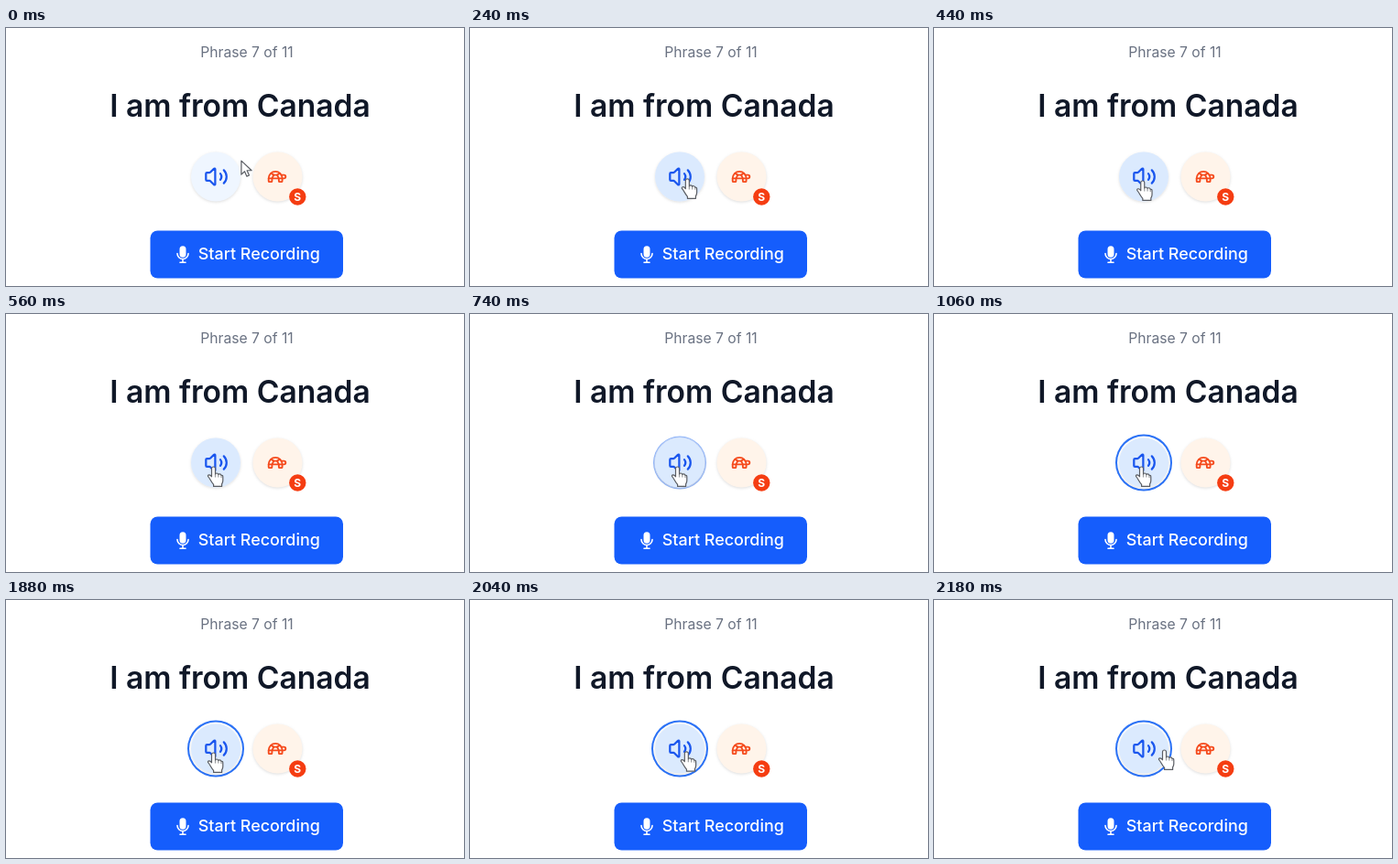
These frames come from a looping animation (500 by 282 pixels, 2.2 s). An HTML page:

```html
<!DOCTYPE html>
<html lang="en">
<head>
<meta charset="utf-8">
<title>Phrase practice</title>
<style>
  html, body { margin: 0; width: 100%; height: 100%; overflow: hidden; background: #fff; }
  svg { display: block; width: 100%; height: 100%; font-family: Inter, sans-serif; }
  text { text-anchor: middle; }
  .icon { fill: none; stroke-width: 2; stroke-linecap: round; stroke-linejoin: round; }
  .round { filter: drop-shadow(0 1px 1.5px rgba(0, 0, 0, .13)); }
  .cursor path { fill: #fff; stroke: #5a5d63; stroke-width: 1.2; stroke-linejoin: round; }
</style>
</head>
<body>
<svg viewBox="0 0 500 282">
  <text x="263" y="31.5" font-size="15.68" fill="#6a7282">Phrase 7 of 11</text>
  <text x="255.5" y="97" font-size="33.6" font-weight="600" fill="#101828">I am from Canada</text>

  <g id="ring">
    <circle id="ringOuter" cx="229" cy="162.5" fill="#2b72f6"/>
    <circle id="ringGap" cx="229" cy="162.5" fill="#fff"/>
  </g>
  <circle class="round" cx="229" cy="162.5" r="27" fill="#eff6ff"/>
  <circle id="hover" cx="229" cy="162.5" r="27" fill="#dbeafe"/>
  <g class="icon" stroke="#1a56ee" transform="translate(229.5 162.5) scale(1.12) translate(-12 -12)">
    <path d="M11 4.7a.7.7 0 0 0-1.2-.5L6.4 7.6A1.4 1.4 0 0 1 5.4 8H3a1 1 0 0 0-1 1v6a1 1 0 0 0 1 1h2.4a1.4 1.4 0 0 1 1 .4l3.4 3.4a.7.7 0 0 0 1.2-.5z"/>
    <path d="M16 9a5 5 0 0 1 0 6M19.4 18.4a9 9 0 0 0 0-12.8"/>
  </g>

  <circle class="round" cx="296.5" cy="162.5" r="27" fill="#fff4ea"/>
  <g class="icon" stroke="#f54a1c" transform="translate(296 162.5) scale(.93) translate(-12 -12)">
    <path d="m12 10 2 4v3a1 1 0 0 0 1 1h2a1 1 0 0 0 1-1v-3a8 8 0 1 0-16 0v3a1 1 0 0 0 1 1h2a1 1 0 0 0 1-1v-3l2-4h4Z"/>
    <path d="M4.8 7.9 8 10M15.2 7.9 12 10M16.9 10H20a2 2 0 0 1 0 4H2"/>
  </g>
  <circle cx="318.3" cy="184.5" r="9.2" fill="#f53d12"/>
  <text x="318.3" y="188.8" font-size="12" font-weight="700" fill="#fff">S</text>

  <rect x="157.5" y="221.5" width="210.5" height="52" rx="8" fill="#155dfc"/>
  <g stroke="#fff" stroke-width="1.6" stroke-linecap="round" fill="none">
    <rect x="190.3" y="239" width="5.4" height="11" rx="2.7" fill="#fff"/>
    <path d="M187 246.5a6 6 0 0 0 12 0M193 252.5v3.5M190 256.3h6"/>
  </g>
  <text x="276.3" y="253.3" font-size="17.9" font-weight="500" fill="#fff">Start Recording</text>

  <g class="cursor" id="arrow"><path d="M0 0v15l3.6-3.4 2.4 5.4 2.6-1.1-2.4-5.3h5z"/></g>
  <g class="cursor" id="hand">
    <path d="M-2 2a2 2 0 0 1 4 0v6q0-1 1.5-1t1.8 1.4q.3-.7 1.5-.6t1.7 1.5q1.8-.3 1.8 1.6v4q0 2-1.2 4v2.5h-9v-2q-2-2.5-3.5-5.2t-2.5-3.6q-.5-1.6 1-1.8t2.9 2z"/>
    <path d="M2 8v3.5M5.3 8.4v3.2M8.5 9.3v2.6" stroke-opacity=".6"/>
  </g>
</svg>
<script>
  const LOOP = 2200, HOVER_AT = 70;
  const byId = id => document.getElementById(id);
  const [ringOuter, ringGap, hover, arrow, hand] =
    ['ringOuter', 'ringGap', 'hover', 'arrow', 'hand'].map(byId);
  const progress = (t, from, to) => Math.min(1, Math.max(0, (t - from) / (to - from)));
  const smooth = p => p * p * (3 - 2 * p);

  function setRing(circle, radius, opacity) {
    circle.setAttribute('r', radius);
    circle.setAttribute('opacity', opacity);
  }

  function draw(t) {
    const arrive = progress(t, 0, 540);
    const leave = progress(t, 1880, 2180) ** 1.5;
    const x = 257 - 30.5 * Math.sin(arrive * Math.PI / 2) + 25 * leave;
    const y = 145 + 22 * (1 - (1 - arrive) ** 4) - 3 * leave;
    const over = t >= HOVER_AT;
    for (const cursor of [arrow, hand]) {
      cursor.setAttribute('transform', `translate(${x} ${y})`);
      cursor.setAttribute('visibility', (cursor === hand) === over ? 'visible' : 'hidden');
    }
    hover.setAttribute('opacity', smooth(progress(t, HOVER_AT, HOVER_AT + 150)));

    const focus = smooth(progress(t, 550, 1060) ** 0.7);
    setRing(ringOuter, 27 + 4 * focus, focus);
    setRing(ringGap, 27 + 2 * focus, focus);
  }

  const start = performance.now();
  function tick() {
    draw((performance.now() - start) % LOOP);
    requestAnimationFrame(tick);
  }
  tick();
</script>
</body>
</html>
```
